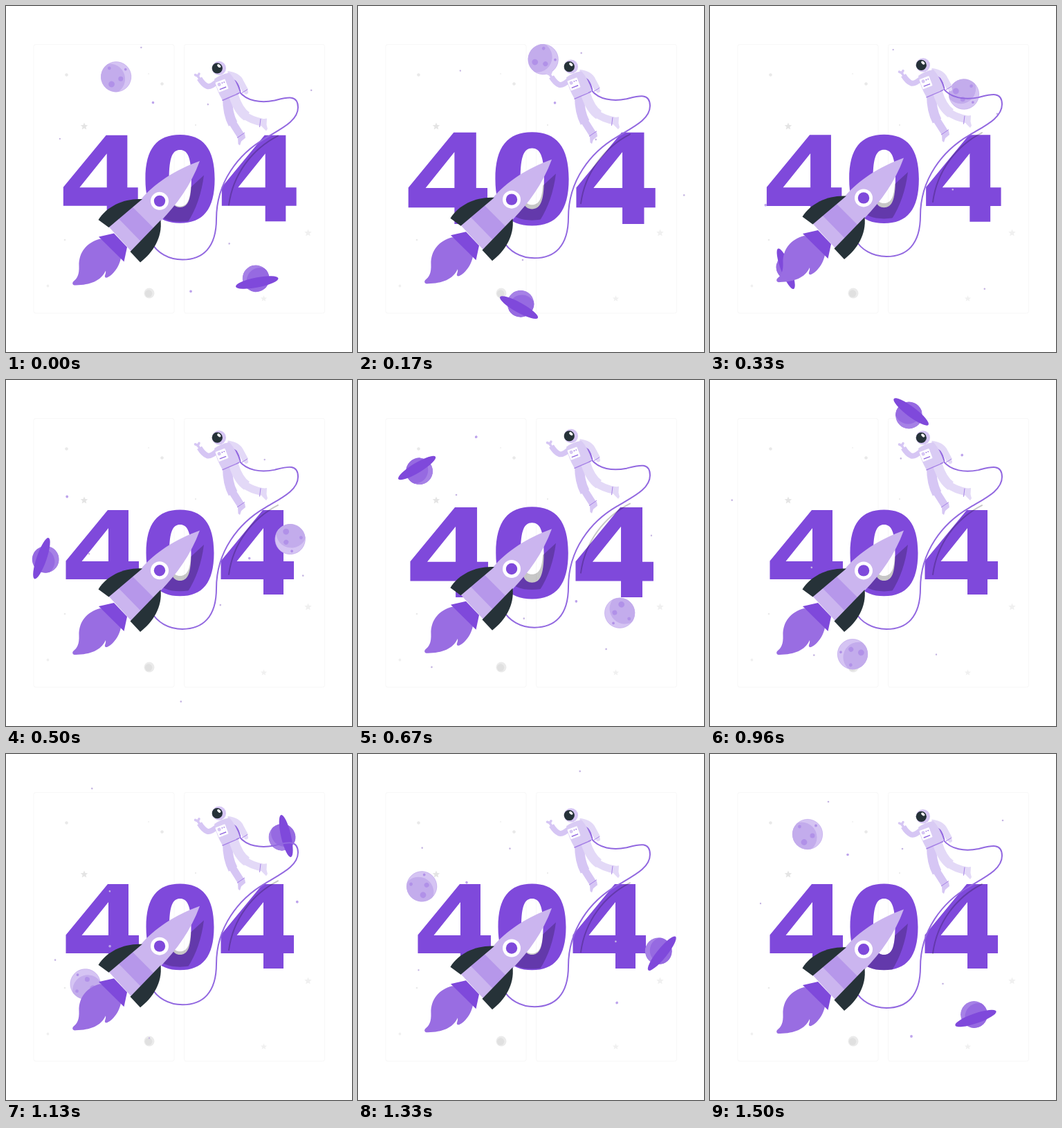
An HTML page that plays this animation: 500 by 500 pixels, repeating every 1.54 s.

```html
<!DOCTYPE html>
<html lang="en">
<head>
<meta charset="utf-8">
<title>404</title>
<style>
  html, body { margin: 0; width: 100%; height: 100%; overflow: hidden; background: #fff; }
  svg { display: block; width: 100%; height: 100%; }
</style>
</head>
<body>
<svg viewBox="0 0 500 500" role="img" aria-label="404">
  <defs>
    <path id="four" fill-rule="evenodd" d="M147 188H177V262H192V288H177V310H148V288H86.500V261.500ZM148 262V214L109.500 262Z"/>
    <path id="zero" fill-rule="evenodd" clip-rule="evenodd" d="M251.500 187.500C284 187.500 300.500 207 300.500 250S284 312.300 251.500 312.300 202.500 293 202.500 250 219 187.500 251.500 187.500ZM251.500 209C241 209 236 219 236 250S241 290 251.500 290 267.500 281 267.500 250 262 209 251.500 209Z"/>
    <path id="star" d="M0-5.500 1.500-1.900 5.300-1.700 2.400.8 3.300 4.500 0 2.400-3.300 4.500-2.400.8-5.300-1.700-1.500-1.900Z"/>
    <path id="hull" d="M280 224.500C245 237 214 257 195 280L148 319 181 355 224 311C247 287 267 260 280 224.500Z"/>
    <clipPath id="zeroClip"><use href="#zero"/></clipPath>
    <clipPath id="hullClip"><use href="#hull"/></clipPath>
    <clipPath id="moonClip"><circle cx="141" cy="116" r="22"/></clipPath>
    <clipPath id="ballClip"><circle cx="381.500" cy="376.500" r="19.500"/></clipPath>
  </defs>

  <g fill="#fff" stroke="#f7f7f7">
    <rect x="40" y="55.500" width="203" height="388.500" rx="3"/>
    <rect x="257.500" y="55.500" width="203" height="388.500" rx="3"/>
  </g>
  <g fill="#e9e9e9">
    <use href="#star" x="113" y="174" fill="#e4e4e4"/>
    <use href="#star" x="436.500" y="328" fill="#f0f0f0"/>
    <use href="#star" transform="translate(372.500 423) scale(.85)" fill="#f0f0f0"/>
    <circle cx="87.500" cy="99.500" r="2.300"/>
    <circle cx="225.500" cy="112.500" r="2.300"/>
    <circle cx="206" cy="98" r="1" fill="#f0f0f0"/>
    <circle cx="274" cy="172" r="1.100"/>
    <circle cx="85" cy="338" r="1.300"/>
    <circle cx="60.500" cy="404.500" r="1.900" fill="#f0f0f0"/>
    <circle cx="207" cy="415" r="7.500" fill="#ebebeb"/>
    <circle cx="206" cy="415.500" r="5.200" fill="#e0e0e0"/>
  </g>

  <g id="digits" fill="#7f49db">
    <use href="#four"/>
    <use href="#zero"/>
    <use href="#four" x="224"/>
  </g>

  <g id="orbit">
    <g fill="#c5b5e2">
      <circle cx="171" cy="69" r="1.300"/>
      <circle cx="73" cy="216" r="1.200"/>
      <circle cx="278" cy="137" r="1.300"/>
      <circle cx="423" cy="96" r="1.300"/>
      <circle cx="336.500" cy="332" r="1.300"/>
      <g fill="#bda3ec">
        <circle cx="199" cy="145.500" r="1.800"/>
        <circle cx="291" cy="408" r="1.900"/>
      </g>
    </g>
    <g clip-path="url(#moonClip)">
      <circle cx="141" cy="116" r="22" fill="#d5c4f3"/>
      <circle cx="132.500" cy="120.500" r="22" fill="#c3acec"/>
    </g>
    <circle cx="141" cy="116" r="21.700" fill="none" stroke="#c3acec" stroke-width=".6"/>
    <g fill="#b191e8">
      <circle cx="129.500" cy="105" r="2.400"/>
      <circle cx="153" cy="103.500" r="1.900"/>
      <circle cx="148" cy="118" r="3.500"/>
      <circle cx="136" cy="127.500" r="4.400"/>
    </g>
    <g clip-path="url(#ballClip)">
      <circle cx="381.500" cy="376.500" r="19.500" fill="#a681e6"/>
      <circle cx="388" cy="379.500" r="19.500" fill="#966ae1"/>
    </g>
    <ellipse rx="31.300" ry="7.200" transform="translate(384 382) rotate(-19)" fill="#7f49db"/>
  </g>

  <g id="float">
    <path clip-path="url(#zeroClip)" opacity=".22" d="M286 245Q281 285 262 314L210 325 228 297 262 267Z"/>
    <g fill="none" stroke-width="2" stroke-linecap="round">
      <path stroke="#000" stroke-opacity=".22" d="M393 188C356 207 328 243 322 288"/>
      <path stroke="#9268e0" d="M337 124C348 138 368 141 388 137C404 133 422 127 422 147C422 167 397 178 374 192C336 214 304 255 304 308C304 350 284 367 255 367C235 367 218 357 210 342"/>
    </g>

    <!-- rocket -->
    <path fill="#996de2" d="M136 337C117 342 105 356 105.500 376C106 389 103 394 97 399C95 402 97 404.500 101 404C122 403.500 137 398 144 383C145 388 141 391 144 393C147 394.500 162 384 166 365L150 340Z"/>
    <path fill="#7f49db" d="M134 334 156 329 175 349 170.500 370Z"/>
    <use href="#hull" fill="#cbb5ef"/>
    <path clip-path="url(#hullClip)" fill="#b697ea" d="M158 303 178 286 217 325 197 343Z"/>
    <g fill="#263238">
      <path d="M197 279.500C172 278 146 289 133.500 309.500L148.500 320.500Z"/>
      <path d="M223.500 310C226 335 213 356 194 371L179.500 355.500Z"/>
    </g>
    <circle cx="222" cy="282.300" r="13" fill="#fff"/>
    <circle cx="222" cy="282.300" r="8.200" fill="#7f49db"/>

    <!-- astronaut -->
    <path fill="#9268e0" d="M329 106 335 109 339.500 124 333 129Z"/>
    <g fill="none" stroke-linejoin="round">
      <path stroke="#d6c6f4" stroke-width="8" d="M306 109Q296 118 291 116.500Q285 114 279.500 105"/>
      <path stroke="#d6c6f4" stroke-width="3.500" stroke-linecap="round" d="M280 106 277 101.500 273.500 100M277 102 279 98.500"/>
      <path stroke="#d6c6f4" stroke-width="14" d="M320 133Q320 156 328 171"/>
      <path stroke="#d6c6f4" stroke-width="11" d="M326 167 340 189"/>
      <path stroke="#e3d9f7" stroke-width="14" d="M329 130Q336 152 348 160"/>
      <path stroke="#e3d9f7" stroke-width="11" d="M343 157Q354 166 372 169"/>
      <path stroke="#e3d9f7" stroke-width="9" d="M320 99Q335 101 339 110L346 123"/>
      <path stroke="#e3d9f7" stroke-width="6" stroke-linecap="round" d="M346 122 347 125"/>
    </g>
    <path fill="#d6c6f4" d="M335 190 345 185 346 191 340 196 338 202 335.500 200Z"/>
    <path fill="#e3d9f7" d="M369 164 377 163 376.500 172 378 178 376 181 370 175Z"/>
    <path fill="#d9cbf4" d="M301 106Q310 99 323 97Q332 107 338 125L313 137Q304 122 301 106Z"/>
    <g fill="none" stroke="#a681e6">
      <path stroke-width="1.500" d="M312.500 137 337 126.500"/>
      <path d="M334 191 345 183.500M368 163.500 366.500 175.500M341 126 349 121"/>
    </g>
    <g transform="translate(312 115.500) rotate(-21)">
      <rect x="-7.500" y="-7.500" width="15" height="15" rx="1" fill="#fff"/>
      <circle cx="-3" cy="-3" r="2.500" fill="#d6c6f4"/>
      <path stroke="#9268e0" stroke-width="1.400" d="M-5 4H5M1-3.500H2.500M4-3.500H5.500"/>
    </g>
    <circle cx="307.800" cy="90.300" r="10.200" fill="#d6c6f4"/>
    <circle cx="305.300" cy="90.300" r="7.600" fill="#263238"/>
    <ellipse rx="3" ry="1.800" transform="translate(307.800 87) rotate(42)" fill="#fff"/>
  </g>
</svg>
<script>
const LOOP = 1540, TICKS = 90;
const [digits, orbit, float] = ['digits', 'orbit', 'float'].map(id => document.getElementById(id));
const beat = [[0, 1], [.1, 1.1], [.3, 1], [.4, 1], [.5, 1.1], [.6, 1], [1, 1]];

function lerpKeys(keys, p) {
  const i = Math.max(1, keys.findIndex(k => k[0] >= p));
  const [a, va] = keys[i - 1], [b, vb] = keys[i];
  return va + (vb - va) * (p - a) / (b - a);
}

// 24 steps per second, each snapped to a 1/60 s tick
function progress(ms) {
  const n = Math.floor(ms % LOOP / 10);
  const step = Math.ceil((6 * n + 3) / 25) - 1;
  return Math.min(TICKS, Math.floor(step * 2.5) + 2) / TICKS;
}

function draw(ms) {
  const p = progress(ms);
  const s = lerpKeys(beat, p);
  const lift = -10 * (1 - Math.abs(2 * p - 1));
  digits.setAttribute('transform', `translate(251.3 249.5) scale(${s}) translate(-251.3 -249.5)`);
  orbit.setAttribute('transform', `rotate(${360 * p} 248 238.800)`);
  float.setAttribute('transform', `translate(0 ${lift})`);
}

const start = performance.now();
function tick() {
  draw(performance.now() - start);
  requestAnimationFrame(tick);
}
tick();
</script>
</body>
</html>
```
